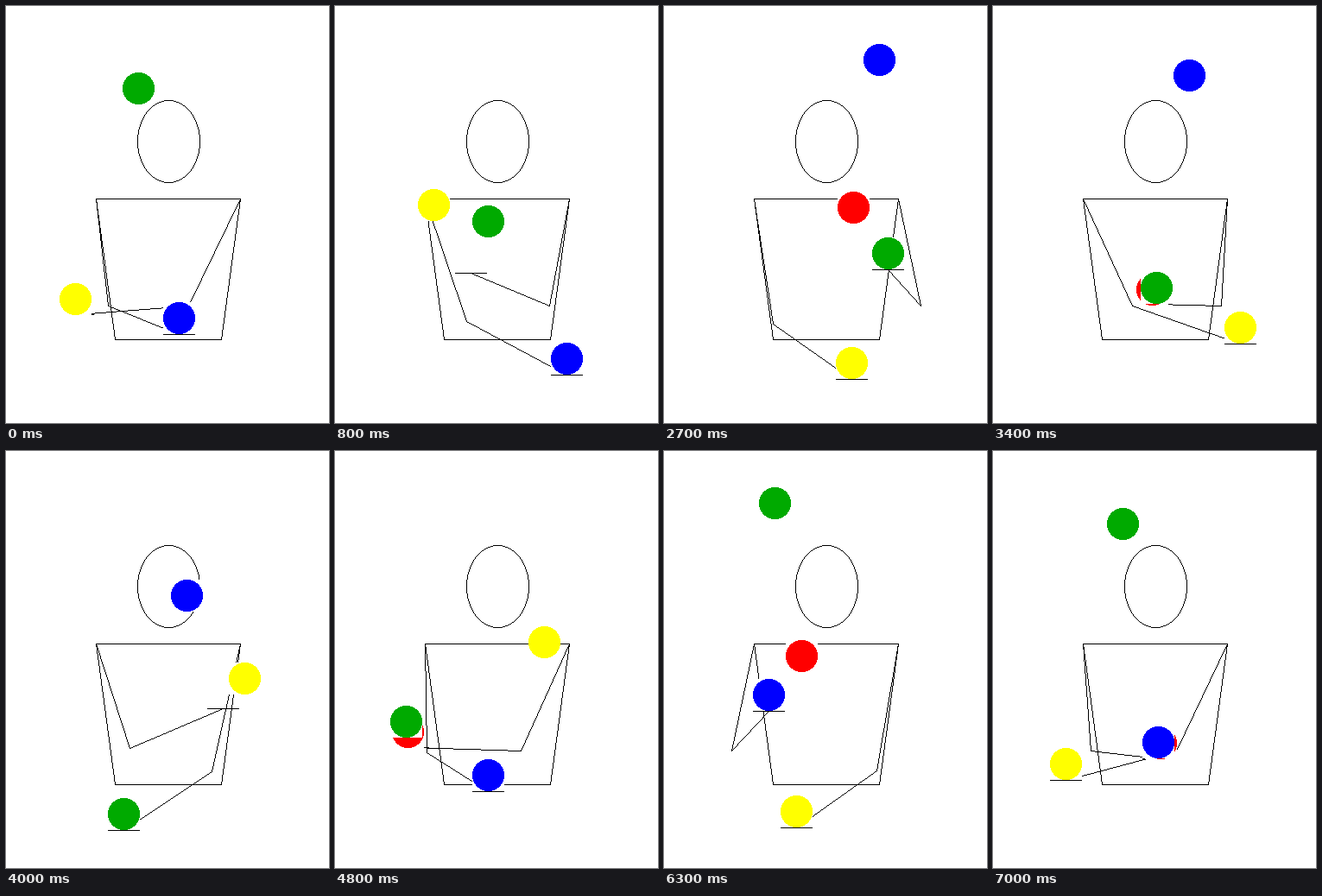
Write an HTML page with a canvas that moves like this. It is 374 px wide and 483 px high and loops after 7.1 s.

```html
<!DOCTYPE html>
<html lang="en">
<head>
<meta charset="utf-8">
<title>Juggler</title>
<style>
  html, body { margin: 0; width: 100%; height: 100%; overflow: hidden; background: #fff; }
  canvas { display: block; }
</style>
</head>
<body>
<canvas id="stage" width="374" height="483"></canvas>
<script>
const ctx = document.getElementById('stage').getContext('2d');
const STEPS = 71, STEP_MS = 100, BEATS = 6, START = 0.48;
const CENTER = 188, LEVEL = 349.9, SWING = 72.7, LOW = 129.7, HIGH = 292;
const OUT = 109.1, IN = 8.9;

// Left hand offset from the body axis at each beat; the right hand mirrors it three beats later.
const HAND_X = [IN, OUT, -IN, OUT, 0, -OUT];

const flip = ([x, y]) => [-x, y];
const arc = (s, from, to, rise) => [from + (to - from) * s, LEVEL - rise * 4 * s * (1 - s)];

function leftHand(beat) {
  const b = beat % BEATS, i = Math.floor(b);
  return arc(b - i, HAND_X[i], HAND_X[(i + 1) % BEATS], i % 2 ? SWING : -SWING);
}
const rightHand = beat => flip(leftHand(beat + 3));

function highBall(beat) {
  const b = beat % BEATS;
  return b >= 1 && b < 4 ? arc((b - 1) / 3, OUT, 0, HIGH) : leftHand(b);
}
function redBall(b) {
  if (b >= 3) return flip(redBall(b - 3));
  return b < 1 ? leftHand(b) : arc((b - 1) / 2, OUT, -IN, LOW);
}
function yellowBall(b) {
  if (b >= 3) return flip(yellowBall(b - 3));
  return b < 2 ? arc(b / 2, -OUT, -IN, LOW) : leftHand(b);
}

const toPixel = ([x, y]) => [Math.floor(CENTER + x), Math.floor(y)];
const dot = (x, y) => ctx.fillRect(Math.round(x), Math.round(y), 1, 1);

// Lines are plotted pixel by pixel to stay crisp.
function polyline(...points) {
  for (let k = 1; k < points.length; k++) {
    const [x0, y0] = points[k - 1], [x1, y1] = points[k];
    const n = Math.max(Math.abs(x1 - x0), Math.abs(y1 - y0), 1);
    for (let i = 0; i <= n; i++) dot(x0 + (x1 - x0) * i / n, y0 + (y1 - y0) * i / n);
  }
}

function drawHead(cx, cy, rx, ry) {
  for (let x = -22; x <= 22; x++) {
    const y = ry * Math.sqrt(1 - (x / rx) ** 2);
    dot(cx + x, cy - y);
    dot(cx + x, cy + y);
  }
  for (let y = -37.5; y <= 37.5; y++) {
    const x = rx * Math.sqrt(1 - (y / ry) ** 2);
    dot(cx - x, cy + y);
    dot(cx + x, cy + y);
  }
}

function drawArm(hand, isRight) {
  const mirror = x => isRight ? 375 - x : x;
  const [x, ballY] = toPixel(hand), y = ballY + 19;
  const elbowX = Math.max(78, Math.floor(mirror(x) / 2 + 18));
  const elbowY = Math.min(y + 46, Math.max(347, Math.floor(y / 2 + 152)));
  polyline([mirror(104), 223], [mirror(elbowX), elbowY], [x, y]);
  ctx.fillRect(x - 18, y, 37, 1);
}

function drawBall(place, color) {
  const [x, y] = toPixel(place);
  ctx.fillStyle = '#fff';
  ctx.fillRect(x - 18, y - 18, 37, 37);
  ctx.fillStyle = color;
  for (let row = -18; row <= 18; row++) {
    const half = Math.floor(Math.sqrt(18.5 ** 2 - row * row));
    ctx.fillRect(x - half, y + row, 2 * half + 1, 1);
  }
}

function draw(now) {
  const step = Math.floor(now / STEP_MS) % STEPS;
  const beat = (step + START) * BEATS / STEPS;

  ctx.fillStyle = '#fff';
  ctx.fillRect(0, 0, 374, 483);
  ctx.fillStyle = '#000';
  drawHead(188, 156.5, 36, 47.5);
  polyline([104, 223], [271, 223], [249, 386], [126, 386], [104, 223]);
  drawArm(leftHand(beat), false);
  drawArm(rightHand(beat), true);

  drawBall(redBall(beat), '#f00');
  drawBall(flip(highBall(beat + 3)), '#0a0');
  drawBall(highBall(beat), '#00f');
  drawBall(yellowBall(beat), '#ff0');
}

const start = performance.now();
function tick() {
  draw(performance.now() - start);
  requestAnimationFrame(tick);
}
tick();
</script>
</body>
</html>
```
